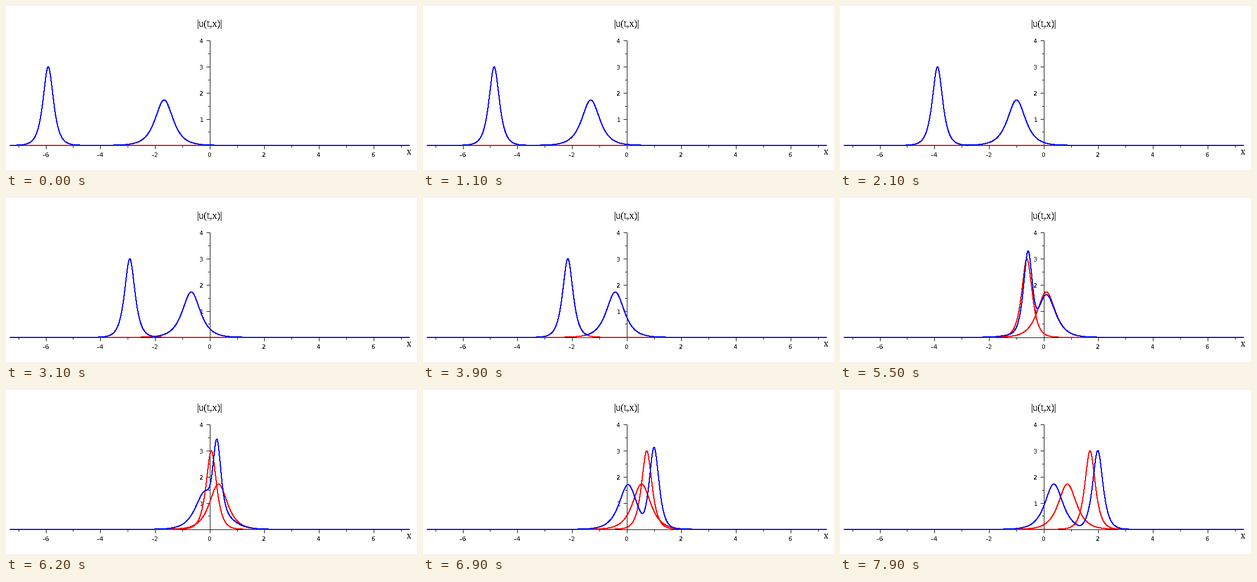
Recreate the animation shown at these times as a matplotlib script. Size 750 by 300 pixels, loop 8000 ms.

```python
import numpy as np
import matplotlib.pyplot as plt
from matplotlib.animation import FuncAnimation

FRAMES, INTERVAL = 80, 100
DT = 0.002675            # model time per frame, collision after 60 frames
X0, SX = 372.2, 49.85    # pixel origin and scale
Y0, SY = 254.8, 47.8
HALF = 7.3               # half width of the plot
PX = 0.72                # points per pixel at 100 dpi

# Two vector solitons with wave numbers K1, K2 and phase difference THETA
K1, K2 = 6.0, 2 * np.sqrt(3)
COS = -0.767
THETA = np.arccos(COS)
R = (K1 - K2) / (K1 + K2)
S = 1 - R**2
D = R**2 * (1 - S * COS**2)
SHIFT1, SHIFT2 = -np.log(D) / (4 * K1), -np.log(D) / (4 * K2)


def single(k, x, t, shift):
    return k / 2 / np.cosh(k * (x - k**2 * t - shift))


def collision(x, t):
    a = np.exp(K1 * (x + SHIFT1) - K1**3 * t)
    b = np.exp(K2 * (x + SHIFT2) - K2**3 * t)
    mix = 2 * R * COS * a * b / (K1 + K2)
    g1 = K1 * a * (1 + R * b**2 + K2 * mix)
    g2 = K2 * b * (1 - R * a**2 - K1 * mix)
    f = 1 + a**2 + b**2 + 2 * S * COS * a * b + D * (a * b)**2
    return np.abs(g1 + g2 * np.exp(1j * THETA)) / f


plt.rcParams["text.antialiased"] = False
fig = plt.figure(figsize=(7.5, 3), dpi=100, facecolor="white")
ax = fig.add_axes([0, 0, 1, 1])
ax.set_xlim(0, 750)
ax.set_ylim(300, 0)
ax.axis("off")


def bar(x, y, w, h):
    ax.add_patch(plt.Rectangle((x, y), w, h, fc="black", lw=0,
                               snap=True, zorder=1))


def label(x, y, text, size, font):
    ax.text(x, y, text, fontsize=size * PX, family=font, zorder=1,
            ha="center", va="baseline")


bar(8, 255, 728, 1)
bar(372, 63, 1, 193)
for n in range(-7, 8):
    x = np.floor(X0 + n * SX)
    bar(x, 255, 1, 7 if n % 2 == 0 else 4)
    if n % 2 == 0:
        text = f"\u2013{-n}" if n < 0 else str(n)
        label(x - 0.5, 276, text, 11, "DejaVu Sans")
for n in range(1, 9):
    y = np.floor(Y0 - n * SY / 2)
    length = 6 if n % 2 == 0 else 3
    bar(372 - length, y, length, 1)
    if n % 2 == 0:
        label(357, y + 4.5, str(n // 2), 11, "DejaVu Sans")
label(371.5, 38, "|u(t,x)|", 18, "Liberation Serif")
label(735, 272, "x", 18, "Liberation Serif")

xs = np.linspace(-HALF, HALF, 1460)


def curve(color, z):
    # without antialiasing a one pixel stroke covers two pixels
    line, = ax.plot(X0 + SX * xs, 0 * xs + Y0, color=color, lw=PX,
                    antialiased=False, snap=False, zorder=z)
    return line


tall, low, total = curve("red", 2), curve("red", 2), curve("blue", 3)


def draw(i):
    t = (i - 60) * DT
    tall.set_ydata(Y0 - SY * single(K1, xs, t, -SHIFT1))
    low.set_ydata(Y0 - SY * single(K2, xs, t, SHIFT2))
    total.set_ydata(Y0 - SY * collision(xs, t))
    return tall, low, total


anim = FuncAnimation(fig, draw, frames=FRAMES, interval=INTERVAL,
                     repeat=True, repeat_delay=0, blit=False)
plt.show()
```
